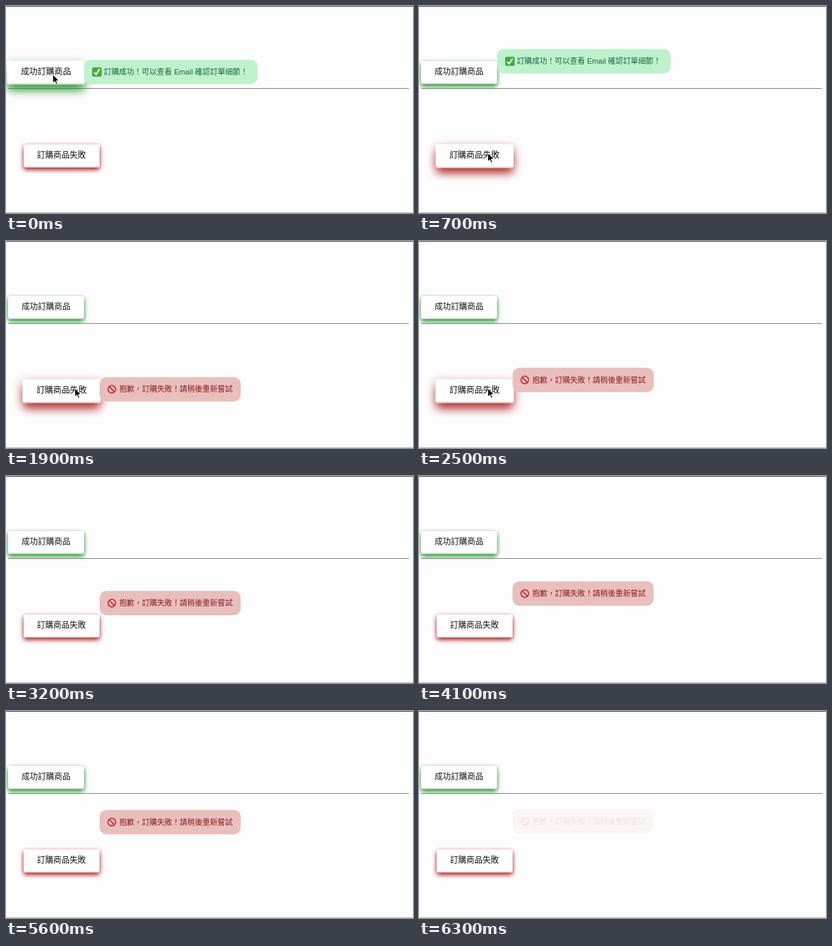
Write an HTML page that moves like this. It is 600 px wide and 305 px high and loops after 6.4 s.

```html
<!DOCTYPE html>
<html lang="zh-Hant">
<head>
<meta charset="utf-8">
<style>
  html, body { margin: 0; width: 100%; height: 100%; overflow: hidden; background: #fefdfe; }
  body { position: relative; font-family: "Liberation Sans", "Noto Sans CJK TC", "Noto Sans CJK", sans-serif; }
  body > * { position: absolute; white-space: nowrap; }
  .line { left: 0; width: 600px; height: 1px; }
  .button {
    width: 112px; height: 34px; border-radius: 3px; background: #fff; color: #111;
    font-size: 12px; font-weight: 500; line-height: 32px; text-align: center;
  }
  .toast { top: 0; height: 35.5px; border-radius: 10px; font-size: 11.15px; line-height: 36px; }
  .toast svg { position: absolute; left: 11.5px; top: 11px; }
  .toast span { position: absolute; left: 29.3px; }
  #successToast { left: 115px; width: 255.5px; background: #bdf2cd; color: #1d6541; }
  #failToast { left: 137.7px; width: 208px; background: #e8bfbd; color: #8c1d1d; }
  #cursor { left: 0; top: 0; overflow: visible; }
</style>
</head>
<body>
<div class="line" style="top:0;background:#444"></div>
<div class="line" style="top:121px;left:3px;width:591px;background:#858585"></div>
<div class="line" style="top:304px;background:#b4b4b4"></div>

<div class="button" id="successButton" style="left:3px;top:81px">成功訂購商品</div>
<div class="button" id="failButton" style="left:25.7px;top:204px">訂購商品失敗</div>

<div class="toast" id="successToast">
  <svg width="14" height="14">
    <rect width="14" height="14" rx="2.5" fill="#43ad3c"/>
    <path d="M3 7.6 5.8 10.6 11 3" fill="none" stroke="#fff" stroke-width="2"/>
  </svg>
  <span>訂購成功！可以查看 Email 確認訂單細節！</span>
</div>
<div class="toast" id="failToast">
  <svg width="14" height="14" fill="none" stroke="#cb3138" stroke-width="1.8">
    <circle cx="7" cy="7" r="5.6"/><path d="M3 3 11 11"/>
  </svg>
  <span>抱歉，訂購失敗！請稍後重新嘗試</span>
</div>

<svg id="cursor" width="10" height="15">
  <path d="M0 0V12.5L3 9.8 5 14.3 7 13.4 5 9H9Z" fill="#000" stroke="#fff" stroke-width=".9"/>
</svg>

<script>
const LOOP = 6400, TOAST_LIFE = 5000, SWAP = 1500;
const $ = id => document.getElementById(id);
const mix = (a, b, k) => a + (b - a) * k;
const ramp = (t, from, to) => Math.min(1, Math.max(0, (t - from) / (to - from)));

// cubic-bezier(.25, .1, .25, 1)
function ease(x) {
  const bezier = (a, b, u) => 3 * a * u * (1 - u) ** 2 + 3 * b * u * u * (1 - u) + u ** 3;
  let lo = 0, hi = 1;
  for (let i = 0; i < 24; i++) {
    const mid = (lo + hi) / 2;
    if (bezier(.25, .25, mid) < x) lo = mid; else hi = mid;
  }
  return bezier(.1, 1, lo);
}

function drawButton(id, rgb, hover) {
  const px = (a, b) => mix(a, b, hover).toFixed(2) + "px";
  const glow = `0 ${px(2, 4)} ${px(6, 14)} rgba(${rgb},${mix(.6, .4, hover)})`;
  const drop = `0 ${px(4, 10)} ${px(7, 13)} ${px(-1, -2)} rgba(${rgb},.75)`;
  const style = $(id).style;
  style.transform = `scale(${mix(1, 1.03, hover)})`;
  style.boxShadow = `inset 0 -2px #dfe3e0, ${glow}, ${drop}`;
}

function drawToast(id, top, age, visible) {
  const life = ramp(age, 0, TOAST_LIFE);
  const style = $(id).style;
  style.visibility = visible ? "visible" : "hidden";
  style.transform = `translateY(${top - 60 * ease(life)}px)`;
  style.opacity = 1 - ease(ramp(life, .9, 1));
}

function drawCursor(t) {
  const down = ease(ramp(t, 50, 750)), up = ramp(t, 2660, 2800) ** 2;
  const x = mix(mix(69, 101.5, down), 115, up);
  const y = mix(mix(101, 217, down), 68, up);
  $("cursor").style.transform = `translate(${x}px,${y}px)`;
  $("cursor").style.visibility = t < 2900 ? "visible" : "hidden";
}

function draw(now) {
  const t = now % LOOP;
  drawButton("successButton", "20,140,30", 1 - ease(ramp(t, 180, 480)));
  drawButton("failButton", "165,15,15", ease(ramp(t, 520, 820)) - ease(ramp(t, 2780, 3080)));
  drawToast("successToast", 82.3, t + 340, t < SWAP);
  drawToast("failToast", 204.5, t - SWAP, t >= SWAP);
  drawCursor(t);
  requestAnimationFrame(() => draw(performance.now()));
}
draw(performance.now());
</script>
</body>
</html>
```
